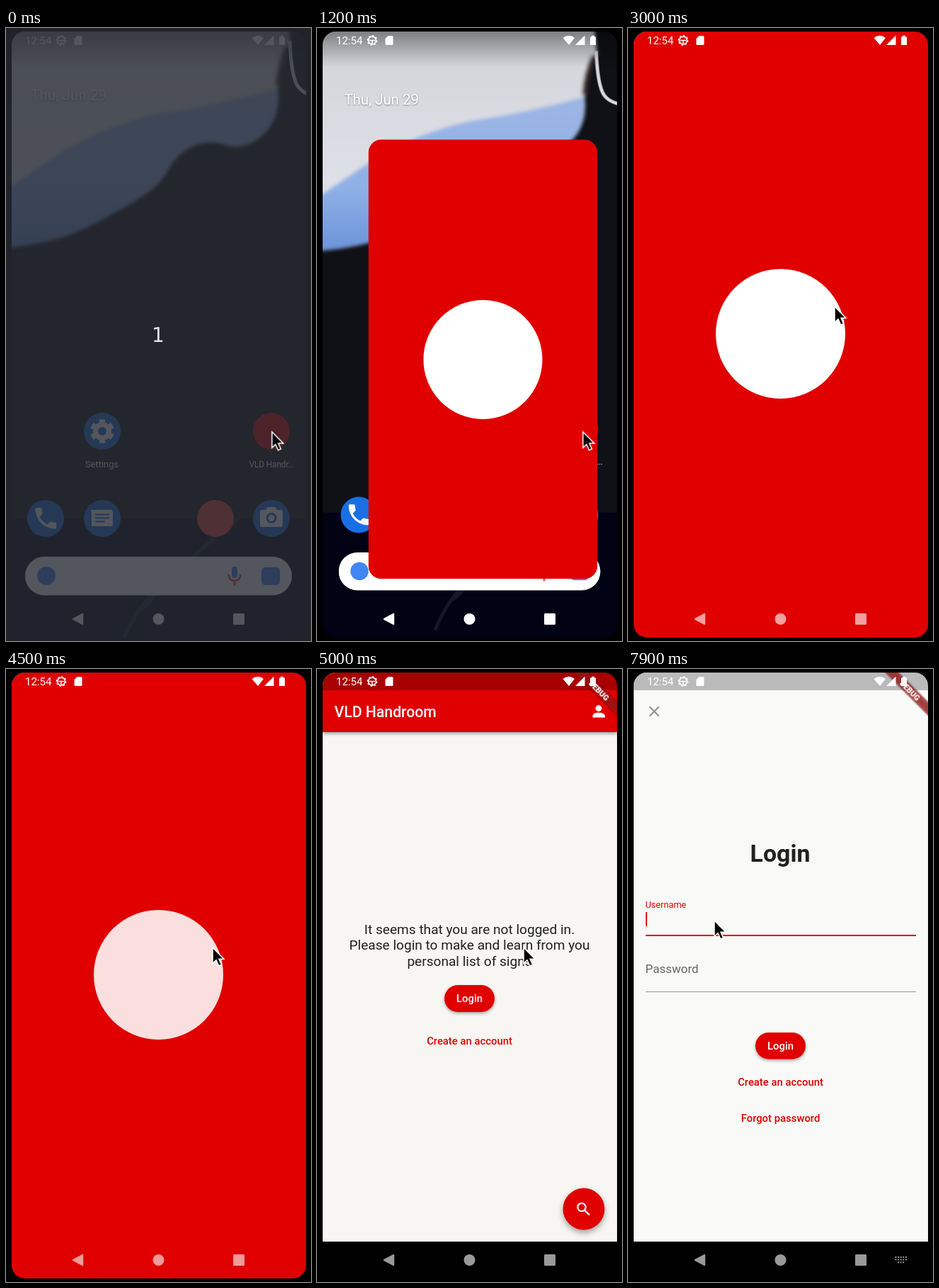
Write an HTML page that moves like this. It is 431 px wide and 865 px high and loops after 8000 ms.

```html
<!DOCTYPE html>
<html lang="en">
<head>
<meta charset="utf-8">
<title>App login</title>
<style>
  html, body { margin: 0; width: 100%; height: 100%; overflow: hidden; background: #000; }
  svg { display: block; }
  text { font-family: Roboto, "Liberation Sans", sans-serif; }
  .mid { text-anchor: middle; }
  .red { fill: #e00000; }
  .btn { font-size: 14.84px; font-weight: 500; }
  .label { font-size: 12.9px; fill: #fff; text-anchor: middle; }
  .lift { filter: drop-shadow(0 2px 2px rgba(0, 0, 0, .35)); }

  .a { animation: 8s linear infinite; }
  #wall, #home { animation-name: recede; transform-origin: 215.5px 432px; }
  #wall { --far: .965; }
  #home { --far: .981; }
  #window { animation-name: window; }
  #mark { animation-name: mark; }
  #app { animation-name: app; }
  #press { animation-name: press; }
  #login { animation-name: login; }
  #form { animation-name: form; transform-origin: 216px 432px; }
  #user { animation-name: user; }
  #line { animation-name: focus; }
  #caret, #keys { animation-name: caret; animation-timing-function: step-end; }
  #nav { animation-name: nav; }
  #dim { animation-name: dim; animation-timing-function: step-end; }
  #pointer { animation-name: pointer; animation-timing-function: ease-in-out; }

  @keyframes dim { 0% { opacity: 1; } 1.25%, 100% { opacity: 0; } }
  @keyframes recede {
    0%, 10.5% { transform: scale(1); }
    15%, 100% { transform: scale(var(--far)); }
  }
  @keyframes window {
    0%, 10% {
      x: 349px; y: 543px; width: 52px; height: 52px; rx: 26px; opacity: 0;
      animation-timing-function: cubic-bezier(.4, 0, .8, .9);
    }
    11% { opacity: 1; }
    15% {
      x: 73px; y: 158px; width: 323px; height: 619px; rx: 18px;
      animation-timing-function: cubic-bezier(.3, .4, .4, 1);
    }
    19.6%, 100% { x: 8px; y: 5px; width: 416px; height: 855px; rx: 18px; opacity: 1; }
  }
  @keyframes mark {
    0%, 10% {
      cx: 375px; cy: 569px; r: 18px; opacity: 0;
      animation-timing-function: cubic-bezier(.4, 0, .8, .9);
    }
    11% { opacity: 1; }
    15% {
      cx: 234.5px; cy: 468px; r: 84px;
      animation-timing-function: cubic-bezier(.3, .4, .4, 1);
    }
    19.6% { cx: 215.5px; cy: 431.5px; r: 91.5px; }
    55.5% { opacity: 1; }
    56.25% { opacity: .88; }
    58.5% { opacity: 0; }
    100% { cx: 215.5px; cy: 431.5px; r: 91.5px; opacity: 0; }
  }
  @keyframes app { 0%, 57.5% { opacity: 0; } 60%, 100% { opacity: 1; } }
  @keyframes press { 0%, 73% { opacity: 0; } 75%, 100% { opacity: .22; } }
  @keyframes login { 0%, 76.6% { opacity: 0; } 78.7%, 100% { opacity: 1; } }
  @keyframes form {
    0%, 76.6% { transform: scale(.94); animation-timing-function: ease-out; }
    78.7%, 100% { transform: scale(1); }
  }
  @keyframes user {
    0%, 96.6% { transform: translate(24.5px, 350px) scale(1); fill: #666; }
    98.7%, 100% { transform: translate(24.5px, 336.5px) scale(.75); fill: #e00000; }
  }
  @keyframes focus { 0%, 96.6% { opacity: 0; } 98.7%, 100% { opacity: 1; } }
  @keyframes caret { 0% { opacity: 0; } 98%, 100% { opacity: 1; } }
  @keyframes nav { 0%, 20.6% { opacity: 1; } 38.75%, 100% { opacity: .6; } }
  @keyframes pointer {
    0%, 16.2% { transform: translate(375.8px, 569.8px); }
    20% { transform: translate(296px, 420px); }
    31.25%, 63.5% { transform: translate(292px, 393px); }
    66.25% { transform: translate(220px, 446px); }
    68.75%, 85.7% { transform: translate(209.5px, 465px); }
    91.25%, 100% { transform: translate(122px, 355px); }
  }
</style>
</head>
<body>
<svg width="431" height="865" viewBox="0 0 431 865">
  <defs>
    <clipPath id="screen"><rect x="8" y="5" width="416" height="855" rx="18.5"/></clipPath>
    <clipPath id="page"><rect x="8" y="5" width="416" height="803"/></clipPath>
    <linearGradient id="pale" x2="0" y2="1">
      <stop offset="0" stop-color="#d2d3d8"/><stop offset="1" stop-color="#e4e6ee"/>
    </linearGradient>
    <linearGradient id="blue" x2="0" y2="1">
      <stop offset="0" stop-color="#9db6e4"/><stop offset=".6" stop-color="#8fb0e6"/>
      <stop offset="1" stop-color="#6c93da"/>
    </linearGradient>
    <linearGradient id="scrim" x2="0" y2="1">
      <stop offset="0" stop-opacity=".4"/><stop offset="1" stop-opacity="0"/>
    </linearGradient>
    <filter id="soft"><feGaussianBlur stdDeviation="2.5"/></filter>
  </defs>

  <g clip-path="url(#screen)">
    <g id="wall" class="a">
      <rect x="-20" y="-20" width="471" height="905" fill="#101116"/>
      <rect x="-20" y="693" width="471" height="200" fill="#010214"/>
      <path d="M165 865Q185 815 225 780T330 690M190 820Q210 810 212 785" fill="none" stroke="#16182a" stroke-width="5"/>
      <g filter="url(#soft)">
        <path fill="url(#pale)" d="M-20-20H398L402 20Q388 50 384 85Q388 120 370 143C350 168 322 172 306 163C275 156 248 170 232 195C215 228 190 240 140 268Q100 290 70 298Q30 309-20 311Z"/>
        <path fill="url(#blue)" d="M-20 240Q8 222 70 180Q140 136 220 120Q300 108 384 85Q388 120 370 143C350 168 322 172 306 163C275 156 248 170 232 195C215 228 190 240 140 268Q100 290 70 298Q30 309-20 311Z"/>
        <path d="M398 25Q386 50 384 82" stroke="#3a2a28" stroke-width="8" fill="none"/>
      </g>
      <path d="M401 18Q403 70 413 83Q422 95 445 97" fill="none" stroke="#d8dae0" stroke-width="5"/>
    </g>
    <rect x="8" y="5" width="416" height="50" fill="url(#scrim)"/>

    <g id="home" class="a">
      <text x="35" y="101.5" font-size="20.8" fill="#fff" style="filter:drop-shadow(0 1px 1px rgba(0,0,0,.4))">Thu, Jun 29</text>

      <g fill="#1a6fe4">
        <circle cx="136" cy="569" r="26"/><circle cx="56" cy="692" r="26"/>
        <circle cx="136" cy="692" r="26"/><circle cx="375" cy="692" r="26"/>
      </g>
      <circle cx="375" cy="569" r="26" class="red"/>
      <circle cx="296" cy="692" r="26" fill="#ea4335"/>
      <g fill="none" stroke="#fff">
        <circle cx="136" cy="569" r="9.5" stroke-width="7"/>
        <circle cx="136" cy="569" r="14.5" stroke-width="5" pathLength="12" stroke-dasharray="1.1 .9" transform="rotate(13 136 569)"/>
      </g>
      <path transform="translate(36.5 672) scale(1.65)" fill="#fff" d="M6.6 10.8c1.4 2.8 3.8 5.1 6.6 6.6l2.2-2.2c.3-.3.7-.4 1-.2 1.1.4 2.3.6 3.6.6.5 0 1 .4 1 1V20c0 .5-.5 1-1 1C10.6 21 3 13.4 3 4c0-.5.5-1 1-1h3.5c.6 0 1 .5 1 1 0 1.2.2 2.4.6 3.6.1.3 0 .7-.3 1z"/>
      <path fill="#fff" d="M120 680H148Q151 680 151 683V700Q151 703 148 703H127L121 703V686Z"/>
      <path d="M126 686.5H146M126 691.5H146M126 696.5H140" stroke="#1a6fe4" stroke-width="2.2"/>
      <path fill="#fff" d="M362 680H367L370 676H380L383 680H388Q391 680 391 683V701Q391 704 388 704H362Q359 704 359 701V683Q359 680 362 680Z"/>
      <circle cx="375" cy="691.5" r="6" fill="#fff" stroke="#1a6fe4" stroke-width="3"/>
      <text class="label" x="135.5" y="619.5">Settings</text>
      <text class="label" x="375.5" y="619.5" style="font-size:12px;letter-spacing:-.2px">VLD Handr...</text>

      <rect x="27" y="746" width="377" height="54.5" rx="27" fill="#fff"/>
      <circle cx="57" cy="773" r="13" fill="#4285f4"/>
      <rect x="319" y="760" width="8" height="16" rx="4" fill="#4285f4"/>
      <path d="M314.5 771Q315 780 323 780T331.5 771M323 780V787" fill="none" stroke="#ea4335" stroke-width="2.6"/>
      <rect x="361" y="761" width="26" height="25" rx="5" fill="#4285f4"/>
    </g>

    <rect id="window" class="a red"/>
    <circle id="mark" class="a" fill="#fff"/>

    <g id="app" class="a">
      <rect x="8" y="5" width="416" height="855"/>
      <g clip-path="url(#page)">
        <rect x="8" y="5" width="416" height="803" fill="#f7f6f2"/>
        <rect x="8" y="20" width="416" height="69" class="red" style="filter:drop-shadow(0 2px 2.5px rgba(0,0,0,.4))"/>
        <rect x="8" y="5" width="416" height="25" fill="#a80000"/>
        <text x="24.5" y="68" font-size="21.2" font-weight="500" fill="#fff">VLD Handroom</text>
        <g fill="#fff">
          <circle cx="398" cy="55.5" r="4.4"/>
          <path d="M389.5 68.5V66Q390 61.5 398 61.5T407 66V68.5Z"/>
        </g>
        <g class="mid" font-size="19.08" fill="#212121">
          <text x="215.5" y="374">It seems that you are not logged in.</text>
          <text x="215.5" y="396.4">Please login to make and learn from you</text>
          <text x="215.5" y="418.8">personal list of signs</text>
        </g>
        <rect x="180" y="446" width="71" height="38" rx="19" class="red lift"/>
        <rect id="press" class="a" x="180" y="446" width="71" height="38" rx="19" fill="#fff"/>
        <text class="mid btn" x="215.5" y="470.3" fill="#fff">Login</text>
        <text class="mid btn red" x="215.5" y="529.5">Create an account</text>
        <circle cx="377" cy="762" r="29.5" class="red" style="filter:drop-shadow(0 4px 4px rgba(0,0,0,.35))"/>
        <g fill="none" stroke="#fff" stroke-width="2.2">
          <circle cx="374" cy="759.5" r="5.7"/><path d="M378 763.5L385 770.5"/>
        </g>

        <g id="login" class="a">
          <rect x="8" y="5" width="416" height="803" fill="#f9f9f7"/>
          <rect x="8" y="5" width="416" height="25" fill="#bababa"/>
          <g id="form" class="a">
            <path d="M30.5 53.3L43.7 66.5M43.7 53.3L30.5 66.5" stroke="#959595" stroke-width="2.2"/>
            <text class="mid" x="215" y="272" font-size="33.9" font-weight="700" fill="#212121">Login</text>
            <text id="user" class="a" font-size="17">Username</text>
            <text x="24.5" y="429" font-size="17" fill="#666">Password</text>
            <path d="M25 376H407M25 455.5H407" stroke="#959595" stroke-width="1.1"/>
            <rect id="line" class="a red" x="25" y="375" width="382" height="2"/>
            <rect id="caret" class="a red" x="25" y="343" width="2" height="20"/>
            <rect x="180" y="513" width="71" height="37.5" rx="18.7" class="red lift"/>
            <text class="mid btn" x="215.5" y="537" fill="#fff">Login</text>
            <text class="mid btn red" x="215.5" y="588">Create an account</text>
            <text class="mid btn red" x="215.5" y="639">Forgot password</text>
          </g>
        </g>

        <g transform="translate(424 5) rotate(45)">
          <rect x="-70" y="29.7" width="140" height="12.7" fill-opacity=".5" filter="url(#soft)"/>
          <rect x="-70" y="29.7" width="140" height="12.7" fill="#b71c1c" fill-opacity=".63"/>
          <text class="mid" y="40" font-size="10.8" font-weight="900" fill="#fff">DEBUG</text>
        </g>
      </g>
      <path id="keys" class="a" d="M377.5 830H394M377.5 833.5H394M381 837.3H390.5" stroke="#999" stroke-width="2" stroke-dasharray="2 1.6"/>
    </g>

    <g fill="#fff">
      <text x="27" y="23.3" font-size="15">12:54</text>
      <g fill="none" stroke="#fff">
        <circle cx="78" cy="17.5" r="5.4" stroke-width="1.6"/>
        <circle cx="78" cy="17.5" r="6.7" stroke-width="1.4" pathLength="16" stroke-dasharray="1"/>
        <path d="M74 17.5H82M78 17.5V22" stroke-width="1.5"/>
      </g>
      <path d="M100.5 11H106Q107.5 11 107.5 12.5V22.5Q107.5 24 106 24H98Q96.5 24 96.5 22.5V15Z"/>
      <path d="M347.5 14Q356 7.5 364 14L356 24Z"/>
      <path d="M378.5 10.5V24H365Z"/>
      <path d="M386 12.5H388V10.8H392V12.5H394V24H386Z"/>
    </g>
    <g id="nav" class="a" fill="#fff">
      <path d="M94.8 834L108.2 826.8V841.2Z" stroke="#fff" stroke-width="2" stroke-linejoin="round"/>
      <circle cx="215.5" cy="834" r="8"/>
      <rect x="321" y="826" width="16" height="16" rx="1.5"/>
    </g>
  </g>

  <g id="dim" class="a">
    <rect width="431" height="865" fill="#282c34" fill-opacity=".8"/>
    <text class="mid" x="215" y="443" font-size="28" fill="#e4e4e4" style="font-family:'DejaVu Sans',sans-serif">1</text>
  </g>

  <path id="pointer" class="a" d="M0 0V22.5L5 17.8L8.8 26L12.6 24.2L9 16.2H16Z" fill="#000" stroke="#fff" stroke-width="1.5"/>
</svg>
</body>
</html>
```
